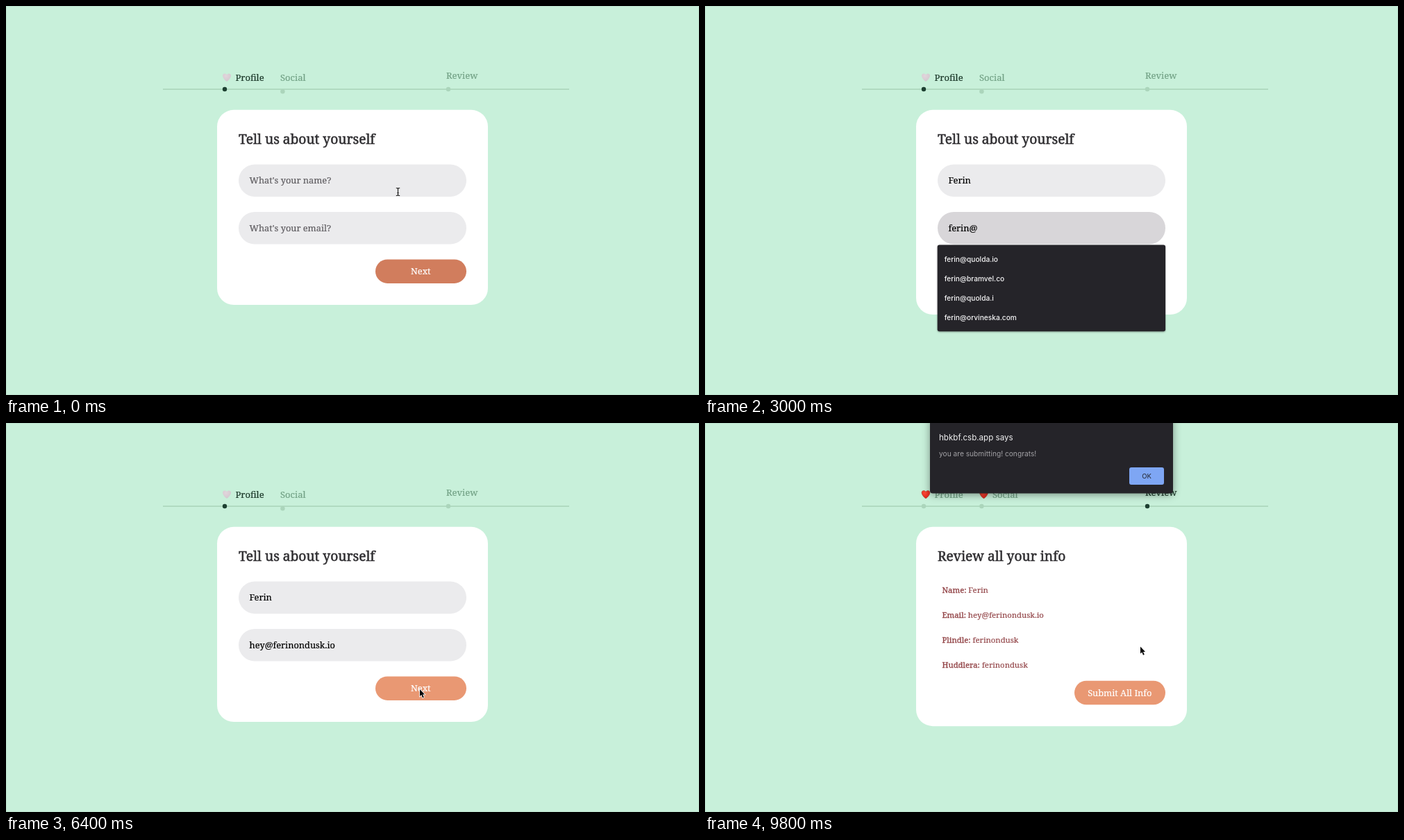
Animation of 998 by 561 pixels, one loop 10 s. Source, as an HTML page:

```html
<!DOCTYPE html>
<html lang="en">
<head>
<meta charset="utf-8">
<title>Sign-up steps</title>
<style>
  html, body { margin: 0; width: 100%; height: 100%; overflow: hidden; background: #c8f0da; }
  svg { display: block; width: 100vw; height: 100vh; }
  text { font: 12.8px "Noto Serif", serif; white-space: pre; color: #000;
    fill: currentColor; stroke: currentColor; stroke-width: .2px; }
  .title { font-size: 19.2px; color: #302f32; stroke-width: .55px; }
  .step { font-size: 13px; }
  .hint { color: #605e62; }
  .note { font-size: 11px; color: #94474a; }
  .info { font-size: 11.3px; color: #94474a; }
  .info tspan { stroke-width: .35px; }
  .button { color: #fff; text-anchor: middle; }
  .item, .preview, .dialog { stroke: none; }
  .item { font: 500 10.2px Inter, sans-serif; color: #f6f6f7; }
  .preview { font: 10.3px "Liberation Sans", sans-serif; }
  .shade { filter: drop-shadow(0 1px 1px rgba(0, 0, 0, .35)); }
  .alert { filter: drop-shadow(0 2px 6px rgba(0, 0, 0, .4)); }
</style>
</head>
<body>
<svg id="stage" viewBox="0 0 998 561" preserveAspectRatio="none"></svg>
<script>
const STEP = 200, LOOP = 10000;
const NAME = "Ferin", HANDLE = "ferinondusk", EMAIL = "hey@ferinondusk.io";
const EMAILS = ["ferin@quolda.io", "ferin@bramvel.co", "ferin@quolda.i",
  "ferin@orvineska.com", "ferin.o@bramvel.co", EMAIL];
const HANDLES = ["ferin", HANDLE];
const TITLES = ["Tell us about yourself", "How can we find you on social?", "Review all your info"];
const HINTS = [["What's your name?", "What's your email?"],
  ["What's your Plindle?", "What's your Huddlera?"]];

const beam = (x, y) => ["beam", x, y], arrow = (x, y) => ["arrow", x, y];

// Each entry changes only what differs from the step before it.
const start = { page: 0, values: ["", ""], focus: 0, errors: [0, 0], list: [], pick: -1,
  preview: "", caret: 0, hover: 0, pointer: beam(564.5, 268), leave: null, alert: 0 };
const typed = mail => ({ values: [NAME, mail], list: EMAILS.filter(e => e.startsWith(mail)) });
const changes = {
  1: { focus: 1, caret: 1, pointer: beam(566, 262) },
  2: { caret: 0, pointer: beam(600, 305) },
  3: { focus: 2, errors: [1, 0], pointer: beam(640, 335) },
  4: { focus: 0, errors: [1, 1], pointer: arrow(763, 345) },
  5: { pointer: arrow(700, 300) },
  6: { focus: 1, pointer: beam(524.5, 270.5) },
  7: { values: ["F", ""], errors: [0, 1], caret: 1, pointer: null },
  8: { values: ["Fer", ""] },
  9: { values: [NAME, ""] },
  10: { caret: 0, pointer: arrow(706, 300) },
  11: { pointer: beam(620, 312) },
  12: { focus: 2, pointer: beam(560, 322) },
  13: { ...typed(""), caret: 1, pointer: null },
  14: typed("feri"),
  15: { ...typed("ferin@"), caret: 0 },
  17: { ...typed("ferin@q"), caret: 1 },
  18: typed("ferin@quo"),
  19: typed("ferin@"),
  20: typed("fer"),
  21: typed(""),
  22: typed("h"),
  23: typed("he"),
  24: typed("hey"),
  25: typed("hey@"),
  26: typed("hey@fer"),
  27: typed("hey@ferinon"),
  28: typed("hey@ferinondusk"),
  29: typed("hey@ferinondusk.i"),
  30: { values: [NAME, EMAIL], list: [], errors: [0, 0] },
  31: { caret: 0, pointer: arrow(588, 405) },
  32: { focus: 0, hover: 1, pointer: arrow(596, 384) },
  33: { page: 1, values: ["", ""], hover: 0, leave: { x: 270, scale: .74, alpha: .4 } },
  34: { leave: null, pointer: arrow(570, 350) },
  35: { pointer: beam(470, 263) },
  36: { focus: 1, caret: 1, list: HANDLES, pointer: beam(432, 260) },
  37: { pick: 0, preview: HANDLES[0], pointer: arrow(439.5, 294) },
  38: { pick: 1, preview: HANDLE, pointer: arrow(440, 321) },
  39: { values: [HANDLE, ""], list: [], pick: -1, preview: "", caret: 0, pointer: beam(442, 330) },
  40: { focus: 2, list: HANDLES, pick: 1, preview: HANDLE, caret: 1, pointer: arrow(446, 390) },
  41: { values: [HANDLE, HANDLE], focus: 0, list: [], pick: -1, preview: "", caret: 0,
        pointer: arrow(597, 386) },
  42: { page: 2, leave: { x: 326.5, scale: .787, alpha: .52 }, pointer: arrow(605, 387.5) },
  43: { leave: null, hover: 1 },
  46: { alert: 1 },
  47: { pointer: arrow(617, 352) },
  48: { pointer: arrow(627, 322.5) }
};
const states = [];
for (let i = 0; i < LOOP / STEP; i++) states.push({ ...(states[i - 1] || start), ...changes[i] });

const pen = document.createElement("canvas").getContext("2d");
const textWidth = (s, font) => (pen.font = font, pen.measureText(s).width);
const text = (x, y, s, cls = "", style = "") =>
  `<text x="${x}" y="${y}" class="${cls}" style="${style}">${s}</text>`;
const box = (x, y, w, h, r, fill, extra = "") =>
  `<rect x="${x}" y="${y}" width="${w}" height="${h}" rx="${r}" fill="${fill}" ${extra}/>`;

function heart(x, red) {
  return `<path transform="translate(${x} 103)" fill="url(#${red ? "red" : "pale"})"
    stroke="${red ? "#9c3a2c" : "none"}" stroke-width=".5"
    d="M0 5.8C-3 4.2-6-.1-6-2.6-6-6-1.5-6.4 0-3.8 1.5-6.4 6-6 6-2.6 6-.1 3 4.2 0 5.8Z"/>`;
}

function progress(page) {
  const tint = i => page === i ? "#1d3a2b" : "#73a286";
  const dot = (x, y, i) => `<circle cx="${x}" cy="${y}" r="3.2" fill="${page === i ? "#1d4031" : "#abd5bb"}"/>`;
  const label = (x, y, s, i) => text(x, y, s, "step", `color:${tint(i)}`);
  const reached = page > 0;
  return box(226, 119.3, 585, 1.5, 0, "#aad4b8")
    + heart(318, reached) + label(330.5, 107.5, "Profile", 0) + dot(315, 120, 0)
    + (reached ? heart(401.5, page > 1) : "") + label(reached ? 414 : 395, 107.5, "Social", 1)
    + dot(398.4, reached ? 120 : 123.3, 1)
    + label(634, 104.5, "Review", 2) + dot(637, 120, 2);
}

function field(s, i, y) {
  const focused = s.focus === i + 1, value = s.values[i], preview = focused && s.preview;
  const fill = preview ? "#e0e2ea" : s.page === 1 && value ? "#e8f0fe" : focused ? "#d8d6d9" : "#ebebed";
  const content = preview ? text(351, y + 27.8, preview, "preview")
    : value ? text(350.5, y + 28, value) : text(350.5, y + 28, HINTS[s.page][i], "hint");
  const caretX = 351 + textWidth(value, '12.8px "Noto Serif", serif');
  return box(335, y, 328, 46.5, 23.2, fill) + content
    + (focused && s.caret ? box(caretX, y + 15.5, 1, 16, 0, "#111") : "")
    + (s.errors[i] ? text(341.5, y + 63.5, i ? "A valid email is required." : "Name is required.", "note") : "");
}

function dropdown(s, y) {
  if (!s.list.length) return "";
  const row = (item, i) => (i === s.pick ? box(335, y + 6 + 28 * i, 328, 28, 0, "#434246") : "")
    + text(344.7, y + 23.8 + 28 * i, item, "item");
  return box(334.7, y - .4, 328.4, 12.9 + 28 * s.list.length, 3, "#252429", 'class="shade"')
    + s.list.map(row).join("");
}

function button(y, label, hover) {
  return box(532, y, 131, 34.5, 17.2, hover ? "#e99873" : "#d17d5d") + text(597.3, y + 21.8, label, "button");
}

function card(s) {
  const sheet = h => box(304, 149.8, 390, h, 24, "#fff") + text(335, 199.2, TITLES[s.page], "title");
  if (s.page === 2) {
    const rows = [["Name", NAME], ["Email", EMAIL], ["Plindle", HANDLE], ["Huddlera", HANDLE]];
    return sheet(287.4)
      + rows.map(([k, v], i) => text(341.5, 245.3 + 36 * i, `<tspan>${k}:</tspan> ${v}`, "info")).join("")
      + button(371.8, "Submit All Info", s.hover);
  }
  const first = 228.4, second = 297 + 14 * s.errors[0], grow = 14 * (s.errors[0] + s.errors[1]);
  return sheet(281.3 + grow) + field(s, 0, first) + field(s, 1, second)
    + button(365.4 + grow, "Next", s.hover)
    + dropdown(s, (s.focus === 1 ? first : second) + 47.8);
}

// The old card shrinks away to the left while the new one comes in over it.
function cards(s, before) {
  if (!s.leave) return card(s);
  const moved = (content, cx, cy, scale, alpha, y) =>
    `<g opacity="${alpha}" transform="translate(${cx} ${cy}) scale(${scale}) translate(-499 ${-y})">${content}</g>`;
  const { x, scale, alpha } = s.leave, middle = s.page === 2 ? 293.6 : 290.6;
  return moved(card({ ...before, hover: 0 }), x, 290.4, scale, alpha, 290.6)
    + moved(card(s), 482.5, middle, 1.0125, .55, middle);
}

function alertBox() {
  const line = (x, y, s, size, color, anchor = "start") =>
    text(x, y, s, "dialog", `font:${size}px Inter,sans-serif;color:${color};text-anchor:${anchor}`);
  return box(324, -8, 350, 109.5, 4, "#252429", 'class="alert"')
    + line(337, 24.8, "hbkbf.csb.app says", 11.6, "#f1f1f2")
    + line(337, 47.5, "you are submitting! congrats!", 10.2, "#a3a2a6")
    + box(611, 64, 50, 25, 3, "#7ea6f4") + line(636, 79.7, "OK", 9.5, "#22242c", "middle");
}

function pointer([kind, x, y]) {
  const shape = kind === "beam"
    ? 'd="M-2.7-5.5Q0-5.5 0-4V4Q0 5.5-2.7 5.5M2.7-5.5Q0-5.5 0-4M0 4Q0 5.5 2.7 5.5M-1.2 1.5H1.2" fill="none" stroke="#222" stroke-width="1.2"'
    : 'd="M0 0V10L2.3 8 4 12.2 5.8 11.4 4 7.4H7Z" fill="#080808" stroke="#fff" stroke-width="1.5" paint-order="stroke"';
  return `<path transform="translate(${x} ${y})" ${shape}/>`;
}

const gradient = (id, from, to) => `<radialGradient id="${id}" cx=".4" cy=".3" r=".8">
  <stop stop-color="${from}"/><stop offset="1" stop-color="${to}"/></radialGradient>`;
const defs = `<defs>${gradient("red", "#ff4a38", "#d91c14")}${gradient("pale", "#e2d5dc", "#d0c8cd")}</defs>`;

function scene(i) {
  const s = states[i];
  return defs + box(0, 0, 998, 561, 0, "#c8f0da")
    + box(.5, .5, 997, 560, 0, "none", 'stroke="#bce2cd"')
    + progress(s.page) + cards(s, states[i - 1])
    + (s.alert ? alertBox() : "") + (s.pointer ? pointer(s.pointer) : "");
}

const stage = document.getElementById("stage"), began = performance.now();
let shown = -1;
function tick() {
  const i = Math.floor((performance.now() - began) % LOOP / STEP);
  if (i !== shown) stage.innerHTML = scene(shown = i);
  requestAnimationFrame(tick);
}
tick();
</script>
</body>
</html>
```
